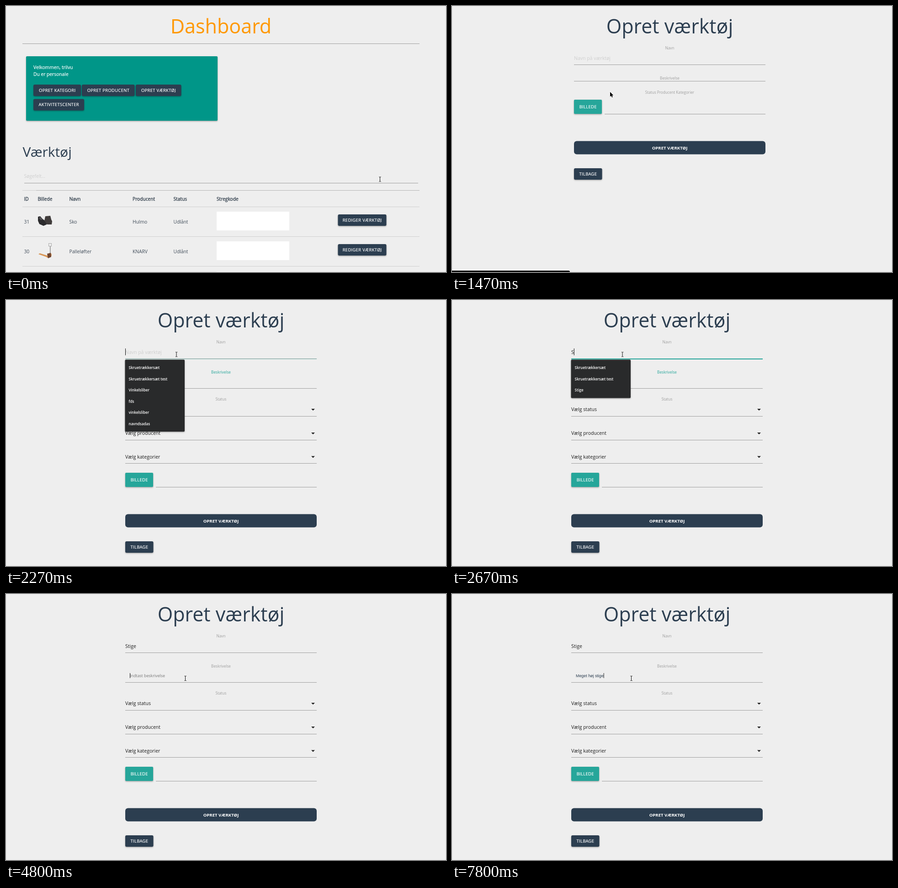
These frames come from a looping animation (963 px wide and 582 px high, 8000 ms). An HTML page with a canvas:

```html
<!DOCTYPE html>
<html lang="da">
<head>
<meta charset="utf-8">
<title>Opret værktøj</title>
<style>
html, body { margin: 0; width: 100%; height: 100%; overflow: hidden; background: #eee; }
canvas { display: block; }
</style>
</head>
<body>
<canvas id="stage" width="963" height="582"></canvas>
<script>
const ctx = document.getElementById('stage').getContext('2d');
const LOOP = 8000;
const NAVY = '#2c3e50', ORANGE = '#ff9800', TEAL = '#26a69a', GRAY = '#9e9e9e';
const SANS = '"Open Sans", "Noto Sans", sans-serif';
const ARIAL = '"Liberation Sans", Arial, sans-serif';

const clamp = v => Math.max(0, Math.min(1, v));
const progress = (t, from, to) => clamp((t - from) / (to - from));
const ease = p => p * p * (3 - 2 * p);
const mix = (a, b, p) => {
  const channel = (hex, i) => parseInt(hex.slice(i, i + 2), 16);
  return `rgb(${[1, 3, 5].map(i => Math.round(channel(a, i) + (channel(b, i) - channel(a, i)) * p))})`;
};

function text(str, x, y, size, color, { weight = 400, align = 'left', spacing = 0, family = SANS, heavy = 0 } = {}) {
  ctx.font = `${weight} ${size}px ${family}`;
  ctx.textAlign = align;
  ctx.letterSpacing = spacing + 'px';
  ctx.fillStyle = ctx.strokeStyle = color;
  ctx.fillText(str, x, y);
  if (heavy) {
    ctx.lineWidth = heavy;
    ctx.strokeText(str, x, y);
  }
  return ctx.measureText(str).width;
}

function rect(x, y, w, h, color) {
  ctx.fillStyle = color;
  ctx.fillRect(x, y, w, h);
}

const rule = (x1, x2, y, color = GRAY, h = 1) => rect(x1, y, x2 - x1, h, color);

function box(x, y, w, h, color, radius = 2, shadow = 0.35) {
  ctx.save();
  ctx.shadowColor = `rgba(0,0,0,${shadow})`;
  ctx.shadowBlur = shadow ? 3 : 0;
  ctx.shadowOffsetY = shadow ? 1.3 : 0;
  ctx.fillStyle = color;
  ctx.beginPath();
  ctx.roundRect(x, y, w, h, radius);
  ctx.fill();
  ctx.restore();
}

function button(label, x, y, w, h = 25, color = NAVY, radius = 3) {
  box(x, y, w, h, color, radius);
  text(label, x + w / 2 + 0.2, Math.round(y + h / 2 + 3.3), 9.4, '#fff', { align: 'center', spacing: 0.34, heavy: 0.2 });
}

function shape(points, color, outline) {
  ctx.beginPath();
  points.forEach(([x, y]) => ctx.lineTo(x, y));
  ctx.closePath();
  if (outline) {
    ctx.strokeStyle = outline;
    ctx.lineWidth = 1.4;
    ctx.stroke();
  }
  ctx.fillStyle = color;
  ctx.fill();
}

// ---- Dashboard ----

function shoes() {
  shape([[70, 461], [75, 460], [80, 466], [90, 473], [89, 478], [82, 481], [73, 477], [70, 470]], '#2b2b2d');
  shape([[86, 460], [97, 459], [99, 467], [101, 471], [100, 478], [90, 478], [84, 470]], '#403c3b');
  shape([[72, 463], [76, 462], [80, 468], [75, 468]], '#555457');
}

function palletLifter() {
  rect(96, 526, 1.5, 17, '#8b8b8b');
  ctx.strokeStyle = '#aaa';
  ctx.lineWidth = 1;
  ctx.strokeRect(93.5, 519.5, 6, 6);
  shape([[71, 543], [74, 541], [90, 546], [99, 541], [100, 546], [91, 551], [88, 549]], '#d89655');
  shape([[90, 542], [98, 540], [99, 549], [92, 552]], '#70452f');
}

function tableRow(y, id, picture, name, maker) {
  const base = y + 36;
  [[id, 39.5], [name, 138.5], [maker, 277], ['Udlånt', 366.5]].forEach(([s, x]) => text(s, x, base, 10.25, '#3f4b58'));
  picture();
  rect(461, y + 10, 159, 41, '#fff');
  button('REDIGER VÆRKTØJ', 726.5, y + 16, 106);
  rule(36, 905, y + 64, '#d0d0d0');
}

function dashboard(t) {
  text('Dashboard', 470.5, 59.5, 43, ORANGE, { align: 'center' });
  rule(36, 905, 82);
  box(44, 110, 419, 141, '#009688');
  text('Velkommen, trilvu', 60, 138, 10.25, '#fff', { heavy: 0.2 });
  text('Du er personale', 60, 153, 10.25, '#fff', { heavy: 0.2 });
  button('OPRET KATEGORI', 60, 172, 104);
  button('OPRET PRODUCENT', 166, 172, 115.5);
  button('OPRET VÆRKTØJ', 284, 172, 99.5, 25, mix(NAVY, ORANGE, progress(t, 360, 580)));
  button('AKTIVITETSCENTER', 60, 203.5, 111);

  text('Værktøj', 36.5, 330, 30, NAVY);
  text('Søgefelt...', 39.5, 376, 10.2, '#cfcfcf');
  rule(40, 902, 387);
  rule(36, 66, 403, '#d0d0d0');
  rule(66, 905, 403, '#b4b4b4');
  [['ID', 39.5], ['Billede', 69.5], ['Navn', 138.5], ['Producent', 277], ['Status', 366.5], ['Stregkode', 461]]
    .forEach(([s, x]) => text(s, x, 426, 10.2, '#34414e', { heavy: 0.35 }));
  rule(36, 905, 439, '#d0d0d0');
  tableRow(440, '31', shoes, 'Sko', 'Hulmo');
  tableRow(505, '30', palletLifter, 'Palleløfter', 'KNARV');
  rect(461, 581, 159, 1, '#fff');
}

// ---- Form ----

const NAME_KEYS = [2470, 3070, 3270, 3400, 3530];
const NOTE_KEYS = [6070, 6200, 6330, 6470, 6530, 6600, 6730, 6870, 7200, 7270, 7400, 7470, 7600, 7800, 7800];
const typed = (str, keys, t) => str.slice(0, keys.filter(k => k <= t).length);

const SETTLED = 1530, FOCUS_NAME = 2200, FOCUS_NOTE = 4200;

function suggestions(t) {
  if (t < FOCUS_NAME || t >= NAME_KEYS[4]) return [];
  if (t < NAME_KEYS[0]) return ['Skruetrækkersæt', 'Skruetrækkersæt test', 'Vinkelsliber', 'fds', 'vinkelsliber', 'navndsadas'];
  return t < NAME_KEYS[1] ? ['Skruetrækkersæt', 'Skruetrækkersæt test', 'Stige'] : ['Stige'];
}

function select(label, y) {
  text(label, 261, y, 10.5, '#1c1c1c');
  shape([[668, y - 5], [676, y - 5], [672, y - 1]], '#222');
  rule(261, 680, Math.floor(y + 11));
}

function label(str, y, color = GRAY) {
  text(str, 470.5, y, 8.2, color, { align: 'center' });
}

function formEnd(y) {
  button('BILLEDE', 261, y, 61, 31, TEAL, 2);
  rule(328, 680, y + 31);
  box(261, y + 90.5, 419, 29, NAVY, 6, 0);
  text('OPRET VÆRKTØJ', 470.5, y + 109, 9.6, '#fff', { weight: 700, align: 'center' });
  button('TILBAGE', 261, y + 150, 61.5);
}

function nameField(t) {
  const name = typed('Stige', NAME_KEYS, t);
  label('Navn', 94.5);
  const width = text(name || 'Navn på værktøj', 261, 118, 10.5, name ? '#1c1c1c' : '#cfcfcf');
  const focus = progress(t, FOCUS_NAME, 2530) * (1 - progress(t, FOCUS_NOTE, 4470));
  rule(261, 680, 128, mix(GRAY, TEAL, focus));
  ctx.globalAlpha = focus;
  rule(261, 680, 129, TEAL);
  ctx.globalAlpha = 1;
  if (t >= FOCUS_NAME && t < FOCUS_NOTE) rect(261 + (name ? width : 0), 106, 1, 15, '#111');
}

function noteField(t) {
  const active = t >= FOCUS_NAME && t < FOCUS_NOTE;
  label('Beskrivelse', 161, active ? TEAL : GRAY);
  const note = typed('Meget høj stige', NOTE_KEYS, t);
  const width = note
    ? text(note, 271, 181.5, 8.9, NAVY, { family: ARIAL })
    : text('Indtast beskrivelse', 271, 182, 8.85, '#777');
  const blinkOn = Math.floor((t - 4270) / 532) % 2 === 0;
  if (t >= 4270 && (note || blinkOn)) rect(271 + (note ? width : 0), 173, 1, 11, '#222');
  rule(261, 680, 193);
}

function menu(items) {
  if (!items.length) return;
  box(260.5, 130.5, 130.5, 10.5 + items.length * 24.5, '#292a2b', 2);
  items.forEach((s, i) => text(s, 268.5, 151 + i * 24.5, 8.1, '#fff', { weight: 600 }));
}

function form(t) {
  const settled = t >= SETTLED;
  ctx.save();
  if (!settled) ctx.translate(6, 0);
  text('Opret værktøj', 470.5, 59.5, 43, NAVY, { align: 'center' });
  nameField(t);
  if (settled) {
    noteField(t);
    label('Status', 220);
    select('Vælg status', 243);
    select('Vælg producent', 295);
    select('Vælg kategorier', 346.5);
    formEnd(378);
  } else {
    label('Beskrivelse', 161);
    rule(261, 680, 164);
    label('Status Producent Kategorier', 191.5);
    formEnd(205);
  }
  menu(suggestions(t));
  ctx.restore();
}

// ---- Pointer ----

function ibeam() {
  rect(-0.5, -4.5, 1, 10, '#111');
  [-5, 5].forEach(y => {
    rect(-2, y, 1.6, 1, '#111');
    rect(0.6, y, 1.6, 1, '#111');
  });
}

function arrow() {
  shape([[0, 0], [0, 10.5], [2.4, 8.3], [4, 12], [5.8, 11.2], [4.2, 7.7], [7.3, 7.4]], '#000', '#fff');
}

function hand() {
  shape([[-1.5, 0], [0.3, -0.6], [1.3, 0.4], [1.5, 4], [6, 5.2], [7.3, 6.6], [6.8, 11], [5.6, 14],
    [0, 14], [-1.5, 11], [-4, 8], [-3.4, 6.6], [-1.5, 7.6]], '#000', '#fff');
}

const STOPS = [
  { from: 30, to: 540, x: 818.5, y: 378.5 },
  { from: 1510, to: 2130, x: 346, y: 188 },
  { from: 3900, to: 4300, x: 373, y: 118.5 },
  { from: LOOP, to: LOOP + 1, x: 392.5, y: 184 }
];

function pointer(t) {
  const i = STOPS.findIndex(s => t < s.to);
  const a = STOPS[i], b = STOPS[i + 1] || a;
  const p = ease(progress(t, a.from, a.to));
  const x = a.x + (b.x - a.x) * p, y = a.y + (b.y - a.y) * p;
  const overField = t < 1330 ? y > 362 : t >= SETTLED && (y < 129 || y > 170 && t > 3900);
  const overButton = t < 1330 && x < 383.5 && y < 197;
  ctx.save();
  ctx.translate(x, y);
  (overButton ? hand : overField ? ibeam : arrow)();
  ctx.restore();
}

function draw(t) {
  rect(0, 0, 963, 582, '#eee');
  (t < 1330 ? dashboard : form)(t);
  if (t >= 1130 && t < 2200) box(-4, 579, 262, 8, '#000', 3, 0);
  pointer(t);
}

const start = performance.now();
function tick() {
  draw((performance.now() - start) % LOOP);
  requestAnimationFrame(tick);
}
tick();
</script>
</body>
</html>
```
